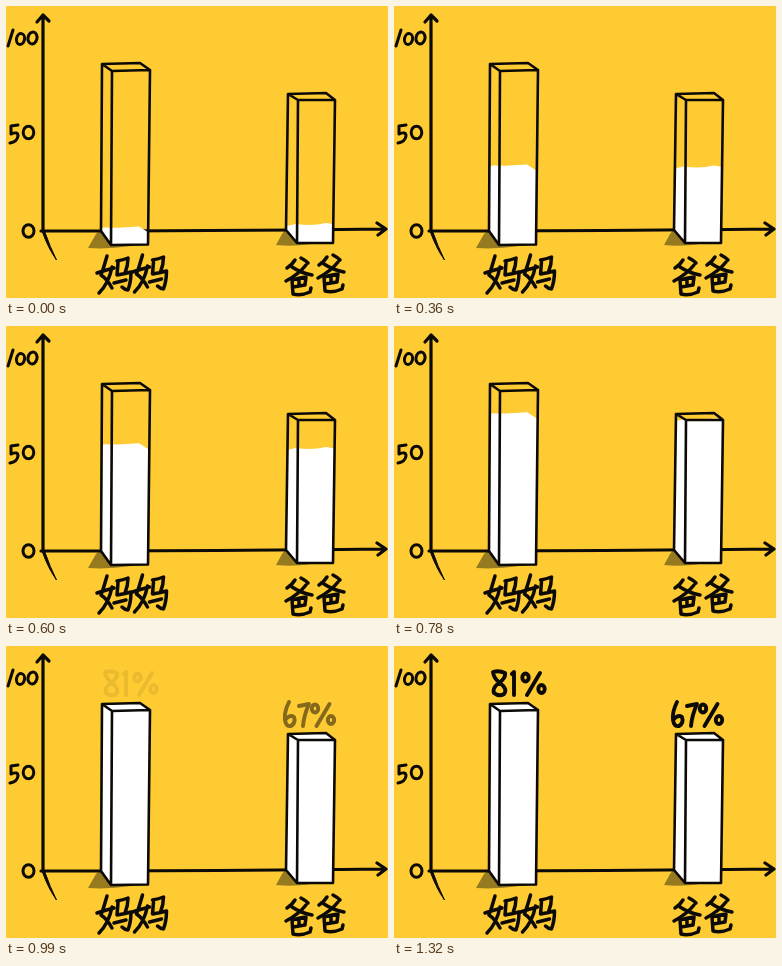
An HTML page for the animation above (1.45 s loop, 382 by 292 pixels).

```html
<!DOCTYPE html>
<html lang="zh">
<head>
<meta charset="utf-8">
<title>妈妈 81% 爸爸 67%</title>
<style>
html, body { margin: 0; width: 100%; height: 100%; overflow: hidden; background: #ffcb33; }
svg { display: block; width: 100vw; height: 100vh; }
.ink { fill: none; stroke: #0c0a06; stroke-width: 2.6; stroke-linecap: round; stroke-linejoin: round; }
.axis { stroke-width: 3.2; }
.scale { stroke-width: 3; }
.name { stroke-width: 3.5; }
.value { stroke-width: 3.9; }
.shade { fill: #967a20; }
.fill { fill: #fff; }
</style>
</head>
<body>
<svg viewBox="0 0 382 292" role="img" aria-label="妈妈 81%, 爸爸 67%">
  <defs>
    <clipPath id="mumBox"><path d="M96 58L134 57L144 64L142 239L105 239L95 225Z"/></clipPath>
    <clipPath id="dadBox"><path d="M282 88L320 87L329 94L327 237L291 237L280 224Z"/></clipPath>
    <g id="ma">
      <path d="M101 250Q98 261 95 269Q101 273 106 282M106 261Q103 277 93 287M91 267Q100 264 108 262"/>
      <path d="M111 255Q117 254 122 252Q122 260 119 267M112 257L111 269Q118 268 125 266Q125 276 122 284Q119 284 116 281M108 277L120 274"/>
    </g>
    <g id="ba">
      <path d="M289 254Q286 259 281 262M295 252Q299 254 302 257M300 259Q293 268 280 275M286 261Q295 267 306 269"/>
      <path d="M286 274Q293 272 300 271L299 279L287 281M293 273L293 279M286 274L287 288Q295 290 304 286L305 282"/>
    </g>
    <g id="percent">
      <ellipse cx="4.500" cy="7.500" rx="3.200" ry="4"/>
      <path d="M19 3L6 25"/>
      <ellipse cx="20.500" cy="19" rx="3.200" ry="4"/>
    </g>
  </defs>
  <rect width="382" height="292" fill="#ffcb33"/>

  <path class="shade" d="M95 224L90 228L82 242Q102 243.500 125 240L105 238Z"/>
  <path class="shade" d="M280 223L276 228L270 239Q286 241 306 238L291 237Z"/>

  <g class="ink axis">
    <path d="M37 9L37 225M31 16L37 9L43 15"/>
    <path d="M35 225Q200 225 379 223M371 217L380 223L372 229"/>
    <path d="M36 225L38.500 225Q44 241 50.500 254Q42 242 36 225Z" fill="#0c0a06" stroke-width="1" style="stroke-width:1"/>
  </g>

  <g clip-path="url(#mumBox)"><path class="fill" id="mumFill"/></g>
  <g clip-path="url(#dadBox)"><path class="fill" id="dadFill"/></g>

  <g class="ink">
    <path d="M96 58L134 57L144 64L106 65ZM96 58L95 225L105 239L142 238.500L144 64M106 65L105 239"/>
    <path d="M282 88L320 87L329 94L292 94ZM282 88L280 224L291 237L327 237L329 94M292 94L291 237"/>
  </g>

  <g class="ink scale">
    <path d="M7 24L2 40"/>
    <ellipse cx="14.500" cy="33" rx="4" ry="5.500" transform="rotate(12 14.500 33)"/>
    <ellipse cx="26.500" cy="32" rx="4.500" ry="6" transform="rotate(12 26.500 32)"/>
    <path d="M12 119L5 120L5 128Q12 125 12 130Q11 136 4 137"/>
    <ellipse cx="22.500" cy="126.500" rx="5.300" ry="6.300"/>
    <ellipse cx="22.500" cy="225" rx="5.500" ry="6.200"/>
  </g>

  <g class="ink name">
    <use href="#ma"/>
    <use href="#ma" x="35.500" y="-1"/>
    <use href="#ba"/>
    <use href="#ba" x="32" y="-3"/>
  </g>

  <g class="ink value" id="mumValue">
    <path d="M111 27Q105 24 99 26Q100 33 106 37Q114 43 110 48Q105 51 100 47Q98 42 105 37Q112 32 111 27M118 28L120 26L120 49"/>
    <use href="#percent" x="127" y="24"/>
  </g>
  <g class="ink value" id="dadValue">
    <path d="M283 56Q278 66 279 74Q280 81 285 80Q290 77 288 71Q284 68 279 74M293 60L303 58Q298 69 297 80"/>
    <use href="#percent" x="304.500" y="55"/>
  </g>
</svg>
<script>
const LOOP = 1450, STEP = 30, LAST = 1320;
const $ = id => document.getElementById(id);
const ramp = (t, from, to) => Math.min(1, Math.max(0, (t - from) / (to - from)));

// Liquid with a slightly uneven surface at height y
const mumLevel = y =>
  `M90 ${y + 1}L100 ${y}Q108 ${y + 0.5} 116 ${y}T133 ${y - 1}L144 ${y + 6}V245H90Z`;
const dadLevel = y =>
  `M276 ${y + 3}L290 ${y}Q297 ${y + 1} 304 ${y + 1}T320 ${y - 1}L332 ${y + 1}V245H276Z`;

function draw(time) {
  const t = Math.min(LAST, Math.floor(time % LOOP / STEP) * STEP);
  $('mumFill').setAttribute('d', mumLevel(221.5 - 0.172 * t));
  $('dadFill').setAttribute('d', dadLevel(218 - 0.16 * t));
  $('mumValue').style.opacity = ramp(t, 960, 1320);
  $('dadValue').style.opacity = ramp(t, 810, 1170);
}

const start = performance.now();
function tick() {
  draw(performance.now() - start);
  requestAnimationFrame(tick);
}
tick();
</script>
</body>
</html>
```
